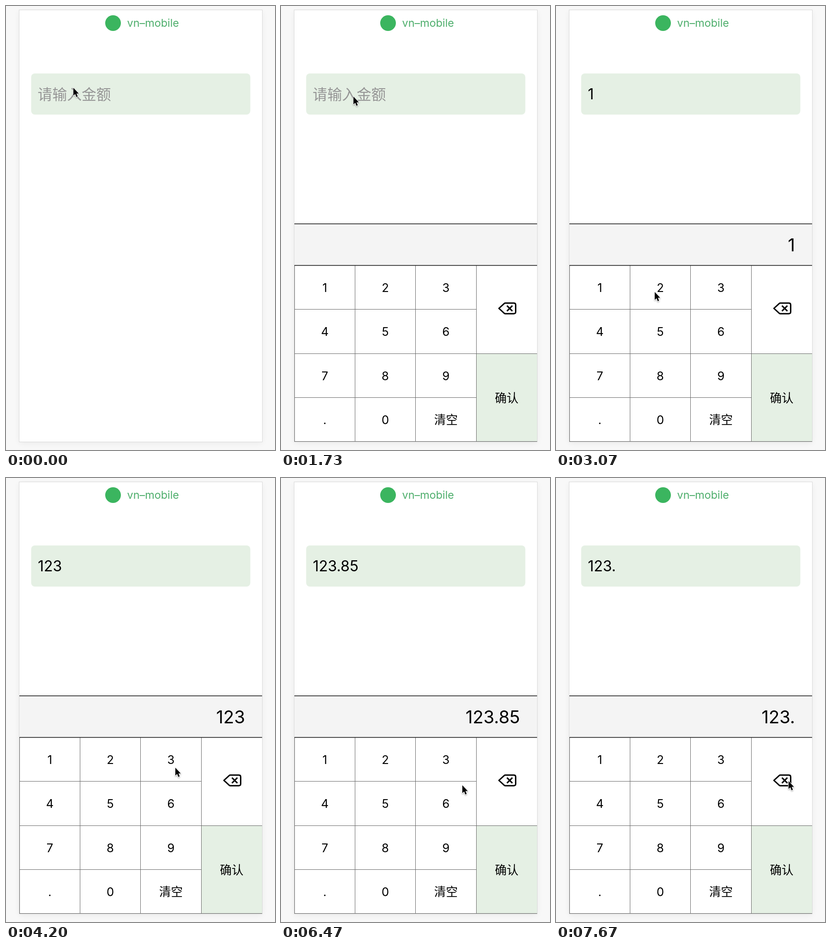
An HTML page that plays this animation: 583 px wide and 961 px high, repeating every 8000 ms.

```html
<!DOCTYPE html>
<html lang="zh">
<head>
<meta charset="utf-8">
<title>vn-mobile</title>
<style>
html, body { margin: 0; width: 100%; height: 100%; overflow: hidden; background: #f8f8f8; }
svg { display: block; width: 583px; height: 961px; }
text { font-family: Inter, "Noto Sans CJK SC", "Noto Sans CJK", sans-serif; white-space: pre; }
</style>
</head>
<body>
<svg viewBox="0 0 583 961">
  <defs>
    <filter id="soft" x="-10%" y="-10%" width="120%" height="120%"><feGaussianBlur stdDeviation="7"/></filter>
    <filter id="drop" x="-60%" y="-40%" width="220%" height="200%">
      <feDropShadow dx="0" dy="1.5" stdDeviation="1.5" flood-opacity=".35"/>
    </filter>
    <clipPath id="inside"><rect x="29" y="9" width="526" height="934"/></clipPath>
  </defs>
  <rect width="583" height="961" fill="#f8f8f8"/>
  <rect x="29" y="12" width="526" height="934" opacity=".06" filter="url(#soft)"/>
  <rect x="28.5" y="8.5" width="527" height="935" fill="#fff" stroke="#dadada"/>
  <circle cx="232" cy="37" r="17" fill="#3bb55f"/>
  <text x="262.5" y="45" font-size="23.4" fill="#4eae6c">vn–mobile</text>
  <rect x="54.5" y="146" width="475" height="89" rx="8" fill="#e5f0e4"/>
  <text id="hint" x="68.6" y="202.5" font-size="31.8" fill="#969696">请输入金额</text>
  <text id="amount" x="69" y="202.3" font-size="32"></text>
  <g clip-path="url(#inside)"><g id="pad"></g></g>
  <path id="mouse" d="M0 0V17L3.9 13.6L6.5 20L9.4 18.8L6.8 12.4H11.8Z" stroke="#fff" stroke-width="1.8" paint-order="stroke" stroke-linejoin="round" filter="url(#drop)"/>
</svg>
<script>
const LOOP = 8000, SLIDE_AT = 1370, SLIDE = 300, PRESS_DELAY = 60;
const GREEN = '#e5f0e4', HELD = '#ebebeb';
const $ = id => document.getElementById(id);
const pad = $('pad');
const keys = {};

function add(tag, attrs, label) {
  const el = document.createElementNS('http://www.w3.org/2000/svg', tag);
  for (const k in attrs) el.setAttribute(k, attrs[k]);
  if (label) el.textContent = label;
  return pad.appendChild(el);
}

const colX = i => Math.floor(29 + 131.4 * i) + 0.5;
const rowY = i => Math.floor(561.5 + 95.25 * i) + 0.5;

function key(name, col, row, span = 1, fill = '#fff') {
  const x = colX(col), y = rowY(row);
  const width = colX(col + 1) - x + 1, height = rowY(row + span) - y;
  const el = add('rect', { x, y, width, height, fill, stroke: '#6a6a6a' });
  keys[name] = { el, fill };
  if (name === 'del') return;
  const drop = name.length > 1 ? 10.3 : 9.6;
  add('text', {
    x: x + width / 2 - 0.5, y: y + height / 2 + drop, 'font-size': 25.6, 'text-anchor': 'middle'
  }, name);
}

add('rect', { x: 28, y: 471.5, width: 529, height: 90, fill: '#f4f4f4' });
['123', '456', '789', '.0'].forEach((line, r) => [...line].forEach((c, i) => key(c, i, r)));
key('清空', 2, 3);
key('del', 3, 0, 2);
key('确认', 3, 2, 2, GREEN);
add('path', { d: 'M29 471.5H556M29 561.5H556', stroke: '#111', 'stroke-width': 1.4 });
add('path', {
  d: 'M472.3 654.5L484.2 643.7Q485 643 486 643H504.5Q508.6 643 508.6 647V662Q508.6 666 504.5 666H486Q485 666 484.2 665.3ZM489.7 648.6L501.5 660.4M501.5 648.6L489.7 660.4',
  fill: 'none', stroke: '#000', 'stroke-width': 3, 'stroke-linejoin': 'round'
});
const total = add('text', { x: 518, y: 531, 'font-size': 38.2, 'text-anchor': 'end' });

// Pointer moves; a move with a key ends in a press of that key.
const moves = [
  { leave: 70, arrive: 530, x: 140, y: 183 },
  { leave: 870, arrive: 1130, x: 157, y: 196 },
  { leave: 1760, arrive: 2340, x: 106, y: 632, key: '1' },
  { leave: 2620, arrive: 3060, x: 214, y: 619, key: '2' },
  { leave: 3470, arrive: 3920, x: 367, y: 627, key: '3' },
  { leave: 4470, arrive: 4720, x: 107, y: 902, key: '.' },
  { leave: 4990, arrive: 5260, x: 219, y: 808, key: '8' },
  { leave: 5610, arrive: 5860, x: 230, y: 715, key: '5' },
  { leave: 6190, arrive: 6470, x: 393, y: 665 },
  { leave: 6470, arrive: 7000, x: 504, y: 656, key: 'del' },
  { leave: 7400, arrive: 7465, x: 504, y: 656, key: 'del', hold: 130 }
];

const clamp = u => Math.min(1, Math.max(0, u));
const smooth = u => u * u * (3 - 2 * u);

function stateAt(t) {
  let x = 146, y = 177, value = '', held = '';
  for (const m of moves) {
    const u = smooth(clamp((t - m.leave) / (m.arrive - m.leave)));
    x += (m.x - x) * u;
    y += (m.y - y) * u;
    const down = m.arrive + PRESS_DELAY, up = down + (m.hold || 200);
    if (!m.key || t < down) continue;
    if (t < up) held = m.key;
    else value = m.key === 'del' ? value.slice(0, -1) : value + m.key;
  }
  return { x, y, value, held };
}

function draw(t) {
  const { x, y, value, held } = stateAt(t);
  const left = 1 - clamp((t - SLIDE_AT) / SLIDE);
  pad.setAttribute('transform', `translate(0 ${473 * left * left})`);
  for (const k in keys) keys[k].el.setAttribute('fill', k === held ? HELD : keys[k].fill);
  $('amount').textContent = total.textContent = value;
  $('hint').style.display = value ? 'none' : '';
  $('mouse').setAttribute('transform', `translate(${x} ${y})`);
}

const start = performance.now();
function tick() {
  draw((performance.now() - start) % LOOP);
  requestAnimationFrame(tick);
}
draw(0);
tick();
</script>
</body>
</html>
```
